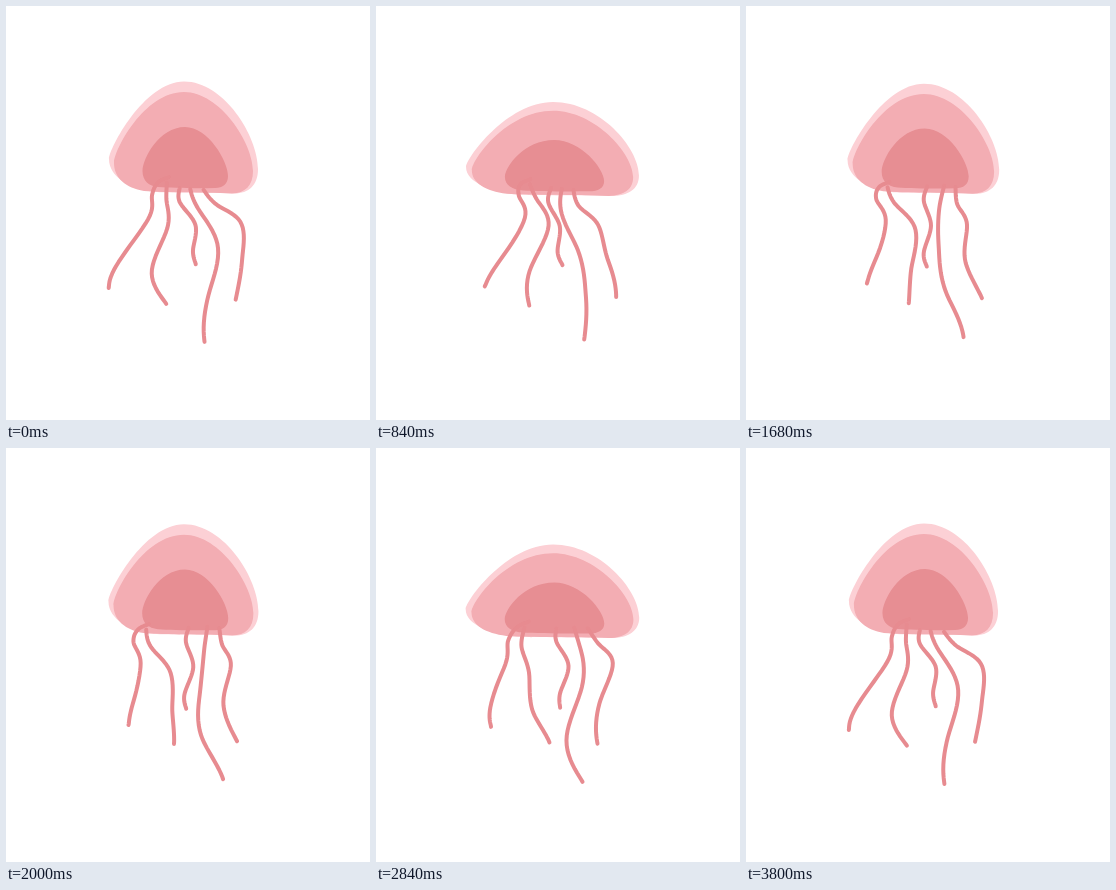
These frames come from a looping animation (364x414 px, 3.84 s). An HTML page:

```html
<!DOCTYPE html>
<html lang="en">
<head>
<meta charset="utf-8">
<title>Jellyfish</title>
<style>
  html, body { margin: 0; width: 100%; height: 100%; overflow: hidden; background: #fff; }
  svg { display: block; width: 364px; height: 414px; }
  #arms path { fill: none; stroke: #e78b90; stroke-width: 4; stroke-linecap: round; stroke-linejoin: round; }
</style>
</head>
<body>
<svg viewBox="0 0 364 414">
  <g id="bell">
    <path fill="#fcd0d5" d="M178 75.5C218 75.5 252 130 252 163C252 179 243 187.5 228 187.5C200 186.5 160 187 148 186C126 183 103 172 103 153C103 143 138 75.5 178 75.5Z"/>
    <path fill="#f3adb3" d="M178 86C214 86 247 137 247 165C247 180 239 187 226 187.5C195 186 160 187 138 185C120 182 108 172 108 157C108 144 138 86 178 86Z"/>
    <path fill="#e78e93" d="M179 121C202 121 222 155 222 170C222 178 217 182 209 182C190 182.5 165 182 152 181C143 180 136.5 175 136.5 165C136.5 153 153 121 179 121Z"/>
  </g>
  <g id="arms"></g>
</svg>
<script>
const LOOP = 3840, PULSE = 1880, STEP = 40;
const RAD = Math.PI / 180;

// Resting shape of each arm; a negative sway mirrors the wave.
const arms = [
  { sway: -10, rest: [[153, 173.5], [142, 179], [137, 191], [139, 214], [117, 262], [112.5, 279.5]] },
  { sway: -10.3, rest: [[150.5, 179], [152.5, 195], [163, 222], [156, 265], [163.5, 297]] },
  { sway: 4.8, rest: [[178, 181], [176.5, 195], [188, 219], [182.5, 246], [185, 259.5]] },
  { sway: 9.7, rest: [[192.5, 181], [194, 199], [202.5, 240], [200, 290], [208, 333.5]] },
  { sway: 9.7, rest: [[205, 182], [212, 197], [229, 217], [227, 255], [231, 293.3]] }
];

// Dense points on a smooth curve through the key points.
function smooth(keys, steps = 10) {
  const out = [];
  for (let i = 0; i < keys.length - 1; i++) {
    const b = keys[i], c = keys[i + 1], a = keys[i - 1] || b, e = keys[i + 2] || c;
    for (let s = i ? 1 : 0; s <= steps; s++) {
      const u = s / steps;
      out.push(b.map((v, k) => v + u / 2 * (c[k] - a[k] +
        u * (2 * a[k] - 5 * v + 4 * c[k] - e[k] + u * (3 * (v - c[k]) + e[k] - a[k])))));
    }
  }
  return out;
}

const bell = document.getElementById('bell');
const group = document.getElementById('arms');
for (const arm of arms) {
  arm.points = smooth(arm.rest);
  arm.path = group.appendChild(document.createElementNS('http://www.w3.org/2000/svg', 'path'));
}

// One slightly tilted wave runs down through all arms.
function sway([x, y], size, turn) {
  const d = size * Math.cos((turn + 250 - 2.02 * y - 0.5 * x) * RAD);
  return [(x + d).toFixed(2), (y - d / 4).toFixed(2)];
}

function draw(t) {
  const squash = 0.165 * Math.sin(Math.PI * t / PULSE) ** 2;
  bell.setAttribute('transform',
    `translate(183.8 202.8) scale(${1 + squash} ${1 - squash}) translate(-183.8 -202.8)`);
  for (const { points, path, sway: size } of arms) {
    path.setAttribute('d', 'M' + points.map(p => sway(p, size, 360 * t / LOOP)).join('L'));
  }
}

const start = performance.now();
function tick(now) {
  const t = Math.max(0, now - start) % LOOP;
  draw(Math.floor(t / STEP) * STEP);
  requestAnimationFrame(tick);
}
draw(0);
requestAnimationFrame(tick);
</script>
</body>
</html>
```
